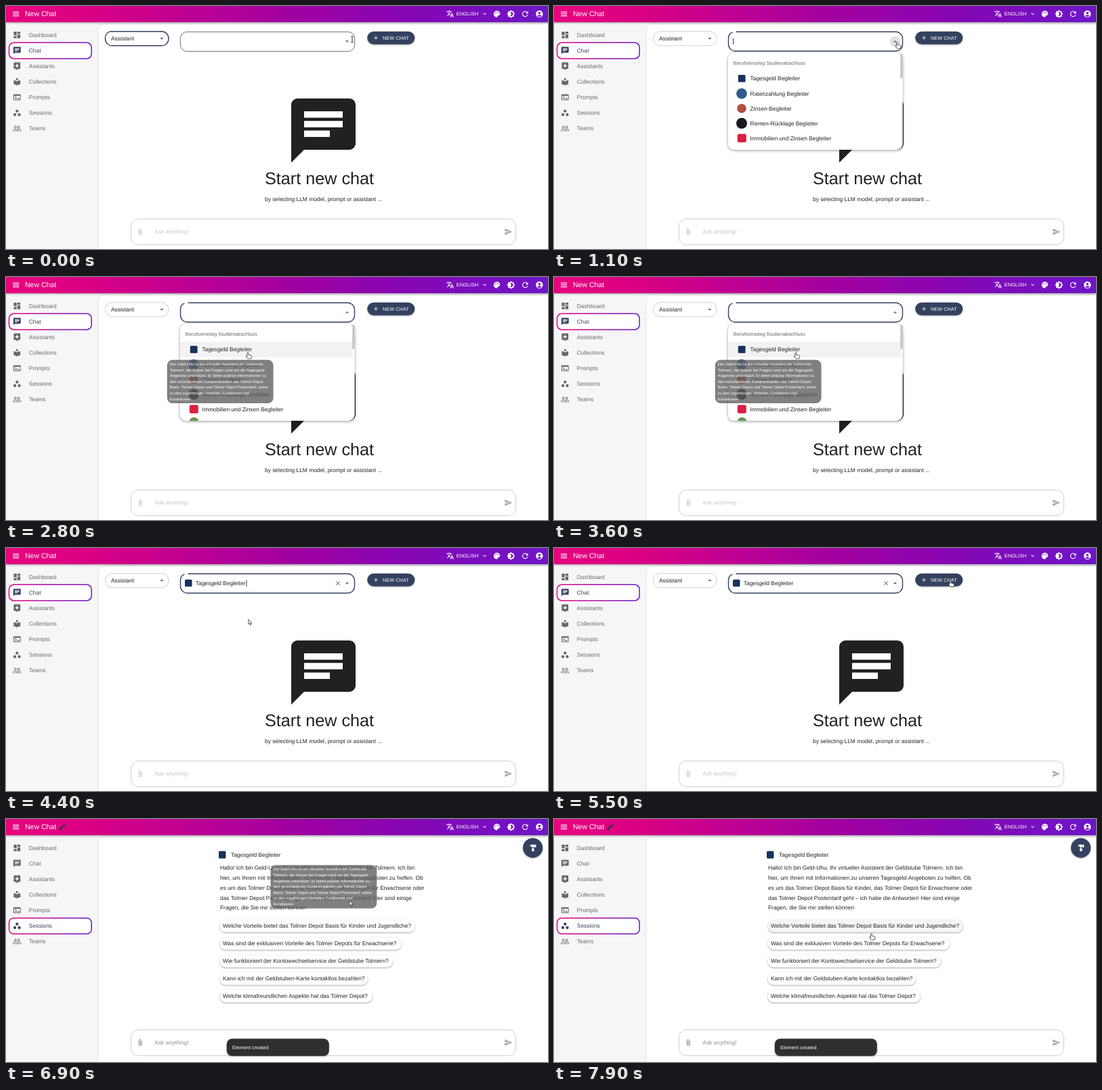
Recreate the animation shown at these times as an HTML page. Size 800 by 360 pixels, loop 8000 ms.

```html
<!DOCTYPE html>
<html lang="en">
<head>
<meta charset="utf-8">
<title>New Chat</title>
<style>
html, body { margin: 0; width: 100%; height: 100%; overflow: hidden; background: #f6f6f8; }
svg { display: block; width: 800px; height: 360px; }
text { font-family: "Liberation Sans", Arial, sans-serif; font-size: 8.4px; text-rendering: geometricPrecision; white-space: pre; }
.shadow { filter: drop-shadow(0 1px 1.2px rgba(0,0,0,.35)); }
</style>
</head>
<body>
<svg id="stage" viewBox="0 0 800 360" xmlns="http://www.w3.org/2000/svg"></svg>
<script>
const LOOP = 8000, STEP = 100;
const NAVY = '#33415f', GREY = '#686868', INK = '#212121';
const stage = document.getElementById('stage');

// Icon paths on a 24 unit grid
const ICON = {
  dashboard: 'M3 13h8V3H3zm0 8h8v-6H3zm10 0h8V11h-8zm0-18v6h8V3z',
  chat: 'M20 2H4c-1.1 0-2 .9-2 2v18l4-4h14c1.1 0 2-.9 2-2V4c0-1.1-.9-2-2-2zM6 9h12v2H6zm8 5H6v-2h8zm4-6H6V6h12z',
  spark: 'M19 2H5c-1.1 0-2 .9-2 2v14c0 1.1.9 2 2 2h4l3 3 3-3h4c1.1 0 2-.9 2-2V4c0-1.1-.9-2-2-2zm-5.1 10.9L12 17l-1.9-4.1L6 11l4.1-1.9L12 5l1.9 4.1L18 11z',
  library: 'M12 11.5C9.6 9.4 6.5 8 3 8v11c3.5 0 6.6 1.4 9 3.5 2.4-2.1 5.5-3.5 9-3.5V8c-3.5 0-6.6 1.4-9 3.5zM12 8a3 3 0 100-6 3 3 0 000 6z',
  terminal: 'M20 4H4a2 2 0 00-2 2v12c0 1.1.9 2 2 2h16a2 2 0 002-2V6a2 2 0 00-2-2zm0 14H4V8h16zm-2-1h-6v-2h6zM7.5 17l-1.4-1.4L8.7 13l-2.6-2.6L7.5 9l4 4z',
  dots: 'M6 13a4 4 0 100 8 4 4 0 000-8zM12 3a4 4 0 100 8 4 4 0 000-8zM18 13a4 4 0 100 8 4 4 0 000-8z',
  people: 'M16.5 13c-1.2 0-3.1.3-4.5 1-1.4-.7-3.3-1-4.5-1C5.3 13 1 14.1 1 16.2V19h22v-2.8c0-2.1-4.3-3.2-6.5-3.2zm-4 4.5h-10v-1.3c0-.5 2.6-1.7 5-1.7s5 1.2 5 1.7zm9 0H14v-1.3c0-.4-.2-.8-.5-1.2.9-.3 1.9-.5 3-.5 2.4 0 5 1.2 5 1.7zM7.5 12a3.5 3.5 0 100-7 3.5 3.5 0 000 7zm0-5.5a2 2 0 110 4 2 2 0 010-4zM16.5 12a3.5 3.5 0 100-7 3.5 3.5 0 000 7zm0-5.5a2 2 0 110 4 2 2 0 010-4z',
  translate: 'M12.9 15.1l-2.6-2.5c1.8-2 3-4.2 3.8-6.6H17V4h-7V2H8v2H1v2h11.2c-.7 1.9-1.8 3.8-3.2 5.4C8.1 10.300 7.300 9.200 6.700 8h-2c.7 1.600 1.700 3.200 3 4.600l-5.100 5L4 19l5-5 3.100 3.100zM18.500 10h-2L12 22h2l1.100-3h4.800l1.100 3h2zm-2.600 7l1.600-4.300 1.600 4.300z',
  palette: 'M12 2a10 10 0 100 20c1.400 0 2.500-1.100 2.500-2.500 0-.6-.2-1.200-.6-1.700-.4-.4 0-.8.4-.8H16c3.300 0 6-2.700 6-6 0-5-4.500-9-10-9zM6.500 9a1.500 1.500 0 110 3 1.500 1.500 0 010-3zM9.500 5a1.500 1.500 0 110 3 1.500 1.500 0 010-3zM14.500 5a1.500 1.500 0 110 3 1.500 1.500 0 010-3zM17.500 9a1.500 1.500 0 110 3 1.500 1.500 0 010-3z',
  bright: 'M20 8.700V4h-4.700L12 .7 8.700 4H4v4.700L.7 12 4 15.300V20h4.700l3.300 3.300 3.300-3.300H20v-4.700l3.300-3.300zM12 18c-.9 0-1.700-.2-2.500-.6a6 6 0 000-10.800A6 6 0 1112 18z',
  refresh: 'M17.600 6.400A8 8 0 1019.700 14h-2.100A6 6 0 1112 6c1.700 0 3.100.7 4.200 1.800L13 11h7V4z',
  account: 'M12 2a10 10 0 100 20 10 10 0 000-20zm0 4a3.500 3.500 0 110 7 3.500 3.500 0 010-7zm0 14c-2 0-4.400-.8-6.100-2.900a10 10 0 0112.200 0C16.400 19.200 14 20 12 20z',
  more: 'M16.600 8.600L12 13.200 7.400 8.600 6 10l6 6 6-6z',
  send: 'M2 21l21-9L2 3v7l15 2-15 2z',
  clip: 'M16.500 6v11.500a4 4 0 01-8 0V5a2.500 2.500 0 015 0v10.500a1 1 0 01-2 0V6H10v9.500a2.500 2.500 0 005 0V5a4 4 0 00-8 0v12.500a5.500 5.500 0 0011 0V6z',
  edit: 'M3 17.200V21h3.800L17.800 9.900l-3.700-3.700zM20.700 7c.4-.4.4-1 0-1.400l-2.300-2.300c-.4-.4-1-.4-1.400 0l-1.900 1.800 3.800 3.800z',
  tool: 'M18 3l-3 3V3H9C6.200 3 4 5.200 4 8h5v3h6V8l3 3h2V3zM9 13v7c0 .6.4 1 1 1h4c.6 0 1-.4 1-1v-7z',
  plus: 'M19 13h-6v6h-2v-6H5v-2h6V5h2v6h6z',
  cross: 'M19 6.400L17.600 5 12 10.600 6.400 5 5 6.400l5.600 5.600L5 17.600 6.400 19l5.600-5.600 5.600 5.600 1.400-1.400-5.600-5.600z'
};

const icon = (name, cx, cy, size, fill, id = '') =>
  `<path ${id && `id="${id}"`} d="${ICON[name]}" fill="${fill}" fill-rule="evenodd" transform="translate(${cx - size / 2} ${cy - size / 2}) scale(${size / 24})"/>`;
const text = (s, x, y, fill = INK, size = 8.4, more = '') =>
  `<text x="${x}" y="${y}" fill="${fill}" style="font-size:${size}px" ${more}>${s}</text>`;
const box = (x, y, w, h, r, fill, more = '') =>
  `<rect x="${x}" y="${y}" width="${w}" height="${h}" rx="${r}" fill="${fill}" ${more}/>`;
const dot = (x, y, r, fill) => `<circle cx="${x}" cy="${y}" r="${r}" fill="${fill}"/>`;
const arrow = (x, y, up) => {
  const d = up ? -1.3 : 1.3;
  return `<path d="M${x - 2.6} ${y - d}h5.2l-2.6 ${2 * d}z" fill="#666"/>`;
};
const group = (id, body) => `<g id="${id}">${body}</g>`;
const line = (x, y, h) => `<path d="M${x} ${y}v${h}" stroke="#222" stroke-width=".9"/>`;

const nav = [['Dashboard', 'dashboard'], ['Chat', 'chat'], ['Assistants', 'spark'],
  ['Collections', 'library'], ['Prompts', 'terminal'], ['Sessions', 'dots'], ['Teams', 'people']];
const rowY = i => 42.8 + 23.1 * i;

const header = box(0, 0, 800, 24, 0, 'url(#bar)', 'style="filter:drop-shadow(0 1px 1.5px rgba(0,0,0,.4))"') +
  [9, 11.8, 14.6].map(y => box(10, y - .6, 9.3, 1.2, 0, '#fff')).join('') +
  text('New Chat', 28, 15.4, '#fff', 10.5) +
  group('pencil', icon('edit', 83, 12, 12.5, '#3a3346')) +
  icon('translate', 655.5, 11.8, 12, '#fff') + text('ENGLISH', 664.7, 14.4, '#fff', 7.45) +
  icon('more', 706.5, 11.6, 10, '#fff') + icon('palette', 724.5, 11.8, 11.5, '#fff') +
  icon('bright', 745.3, 11.8, 12.5, '#fff') + icon('refresh', 766.3, 11.8, 13, '#fff') +
  icon('account', 787.3, 11.8, 12.5, '#fff');

const sidebar = group('mark', box(4.5, 54.3, 121.7, 23.6, 7, '#fff', 'stroke="url(#edge)" stroke-width="1.5"')) +
  nav.map(([label, name], i) => icon(name, 16.3, rowY(i), 13, GREY, 'ni' + i) +
    text(label, 33.8, rowY(i) + 3, GREY, 8.4, `id="nt${i}"`)).join('');

const hero = icon('chat', 468.5, 184.5, 114, INK) +
  text('Start new chat', 382, 264, INK, 25.2) +
  text('by selecting LLM model, prompt or assistant ...', 382, 289, INK);

const notched = (x, y, w, h, r, gap, color, width) =>
  `<path d="M${x + r + gap} ${y}H${x + w - r}a${r} ${r} 0 01${r} ${r}V${y + h - r}a${r} ${r} 0 01${-r} ${r}H${x + r}a${r} ${r} 0 01${-r} ${-r}V${y + r}q0 ${-r * .75} ${r * .6} ${-r * .94}" fill="none" stroke="${color}" stroke-width="${width}"/>`;

const controls =
  group('selDark', notched(146.500, 37.800, 93.500, 21, 10, -4, NAVY, 1.4)) +
  group('selLight', box(146.500, 37.800, 93.500, 21, 10, 'none', 'stroke="#ccd0d8"')) +
  text('Assistant', 155, 51, INK) + arrow(230, 48.4) +
  group('boxIdle', box(257.300, 38.300, 257.400, 29, 10, 'none', 'stroke="#666f80"')) +
  group('boxFocus', notched(257.500, 38.300, 257, 28.500, 10, 1, NAVY, 1.4)) +
  group('halo', dot(503.5, 52.6, 8, '#e2e2e2')) +
  group('down', arrow(503.5, 52.6)) + group('up', arrow(503.5, 52.2, true)) +
  group('caret1', line(264.6, 47.500, 9.500)) +
  group('chosen', box(264, 46.800, 10.500, 10.500, 1.500, '#17325c') + text('Tagesgeld Begleiter', 279.8, 55) +
    icon('cross', 490, 52.3, 10.5, '#666')) +
  group('caret2', line(355, 47.500, 9.500)) +
  `<g class="shadow">${box(533.3, 37.800, 70, 19, 9.5, NAVY)}</g>` +
  icon('plus', 546, 47.2, 10, '#fff') + text('NEW CHAT', 556, 49.9, '#fff', 7.35);

const options = ['Tagesgeld Begleiter', 'Ratenzahlung Begleiter', 'Zinsen-Begleiter',
  'Renten-Rücklage Begleiter', 'Immobilien und Zinsen Begleiter'];
const badges = [box(271.800, 102, 10.800, 10.800, 1.500, '#17325c'), dot(277, 129.7, 7.8, '#2f5b8c'),
  dot(277, 151.8, 6.8, '#b1503f'), dot(277, 173.8, 8, '#17191e'), box(270.800, 189.500, 13, 12.500, 2.500, '#dc1f3f')];
const menu = `<g style="filter:drop-shadow(0 1px 2px rgba(0,0,0,.4))">${box(256.8, 69.5, 257.900, 143.500, 9, '#fff')}</g>` +
  text('Berufseinstieg Studienabschluss', 264.8, 86.7, '#666', 7.35) +
  group('hover', box(257, 96.200, 254.500, 22.800, 0, '#f2f2f2')) +
  badges.join('') + options.map((s, i) => text(s, 289.6, 110.4 + 22.1 * i)).join('') +
  group('sixth', '<path d="M271 213a6.500 5 0 0113 0z" fill="#62994f"/>') +
  box(511.300, 71, 3.200, 36, 1, '#c3c3c3');

const tipLines = ['Der Geld-Uhu ist ein virtueller Assistent der Geldstube',
  'Tolmern, der Nutzer bei Fragen rund um die Tagesgeld-',
  'Angebote unterstützt. Er liefert präzise Informationen zu',
  'den verschiedenen Kontenmodellen wie Tolmer Depot',
  'Basis, Tolmer Depot und Tolmer Depot Postentarif, sowie',
  'zu den zugehörigen Vorteilen, Funktionen und', 'Konditionen'];
const tip = (id, x, y) => group(id, box(x, y, 156.800, 64.300, 8, '#616161', 'fill-opacity=".8"') +
  tipLines.map((s, i) => text(s, x + 4, y + 8.1 + 8.6 * i, '#fff', 5.75)).join(''));

const BONE = '#e0e0e2';
const skeleton = [0, 1, 2, 3].map(i => {
  const y = 37 + 35.6 * i, left = i % 2;
  return box(left ? 274.5 : 453, y, 210, 26.500, 0, BONE) + dot(left ? 245.4 : 692.4, y + 6, 10.2, BONE);
}).join('');

const reply = ['Hallo! Ich bin Geld-Uhu, Ihr virtueller Assistent der Geldstube Tolmern. Ich bin',
  'hier, um Ihnen mit Informationen zu unseren Tagesgeld-Angeboten zu helfen. Ob',
  'es um das Tolmer Depot Basis für Kinder, das Tolmer Depot für Erwachsene oder',
  'das Tolmer Depot Postentarif geht – ich habe die Antworten! Hier sind einige',
  'Fragen, die Sie mir stellen können'];
const asks = [['Welche Vorteile bietet das Tolmer Depot Basis für Kinder und Jugendliche?', 288],
  ['Was sind die exklusiven Vorteile des Tolmer Depots für Erwachsene?', 268.5],
  ['Wie funktioniert der Kontowechselservice der Geldstube Tolmern?', 255.5],
  ['Kann ich mit der Geldstuben-Karte kontaktlos bezahlen?', 218.5],
  ['Welche klimafreundlichen Aspekte hat das Tolmer Depot?', 225.5]];
const answer = box(314, 47.500, 10.500, 11, 1.5, '#17325c') + text('Tagesgeld Begleiter', 332, 56) +
  reply.map((s, i) => text(s, 316, 75.400 + 14.7 * i)).join('') +
  asks.map(([s, w], i) => `<g class="shadow">${box(315.500, 149.500 + 26 * i, w, 18.300, 9, '#fff', `id="ask${i}"`)}</g>` +
    text(s, 320, 160.7 + 26 * i)).join('') +
  `<g class="shadow">${dot(777.6, 42.8, 14.6, NAVY)}</g>` + icon('tool', 777.8, 42.8, 13.5, '#fff');

const prompt = box(184.500, 315.500, 568, 38.300, 11, '#fff', 'stroke="#cbcfd7"') +
  icon('clip', 198, 334.500, 11, '#777', 'clip') + text('Ask anything!', 219.3, 337.4, '#8c8c8c', 8.4, 'id="ask"') +
  icon('send', 741.5, 334.5, 12.800, '#a9a9a9');

const snack = `<g class="shadow">${box(325.800, 325.500, 151, 25.500, 8, '#2f2f2f')}</g>` + text('Element created', 334, 340.900, '#fff', 7.35);

const outline = 'stroke="#333" stroke-width=".8" stroke-linejoin="round"';
const cursor = group('cursor',
  group('beam', '<path d="M-2-4q2 0 2 1 0-1 2-1M0-3v7M-2 5q2 0 2-1 0 1 2 1" fill="none" stroke="#222" stroke-width=".9"/>') +
  group('point', `<path d="M0 0v7.500l1.700-1.600 1.200 2.700 1.200-.6-1.200-2.500h2.300z" fill="#fff" ${outline}/>`) +
  group('hand', `<path d="M0 .8q.9-1.200 1.800 0v3l4 .8q1 .3 .8 1.500l-.7 3.400H1L-1.900 5.800q0-1.300 1.900 .2z" fill="#fff" ${outline}/>`));

stage.innerHTML = `<defs>
  <linearGradient id="bar"><stop offset="0" stop-color="#e8047f"/><stop offset=".16" stop-color="#d90084"/>
  <stop offset=".5" stop-color="#a4009f"/><stop offset=".75" stop-color="#8507b5"/><stop offset="1" stop-color="#6d16c8"/></linearGradient>
  <linearGradient id="edge"><stop offset="0" stop-color="#e6007e"/><stop offset="1" stop-color="#6a16c6"/></linearGradient></defs>` +
  box(0, 0, 800, 360, 0, '#f6f6f8') +
  box(136, 26.500, 680, 350, 9, '#fff', 'stroke="#e2e2e6"') + sidebar +
  group('start', hero + controls) + group('bones', skeleton) + group('answer', answer) +
  group('prompt', prompt) + group('menu', menu) + tip('tip1', 237.8, 122.8) + tip('tip2', 390.500, 68.300) +
  header + group('snack', snack) + cursor;

const $ = id => document.getElementById(id);
const show = (id, on) => { $(id).style.display = on ? '' : 'none'; };
const clamp = v => Math.max(0, Math.min(1, v));
const fade = (t, a, b) => clamp((t - a) / 200) * clamp((b - t) / 200);

// time, x, y of the pointer tip
const path = [[0, 511, 49], [400, 511, 49], [800, 505.5, 53.500], [1400, 505.5, 53.500], [2200, 356, 111.500],
  [3700, 356, 111.500], [3900, 357.8, 105.500], [4500, 357.8, 105.500], [5300, 584, 48], [6300, 584, 48],
  [6800, 507, 121], [7200, 507, 121], [7700, 467.5, 169.500], [8000, 467.5, 169.500]];
function pointer(t) {
  const i = path.findIndex(k => k[0] > t), a = path[i - 1], b = path[i];
  const p = (t - a[0]) / (b[0] - a[0]), e = p * p * (3 - 2 * p);
  return [a[1] + (b[1] - a[1]) * e, a[2] + (b[2] - a[2]) * e];
}

function draw(t) {
  const open = t >= 900 && t < 3700, picked = t >= 3700, session = t >= 6000, done = t >= 6500;
  show('start', !session);
  show('bones', session && !done);
  show('answer', done);
  show('pencil', session);
  show('menu', open);
  show('selDark', t < 900);
  show('selLight', t >= 900);
  show('boxIdle', t < 900);
  show('boxFocus', t >= 900);
  show('halo', t >= 700 && t < 1600);
  show('up', open);
  show('down', !open);
  show('chosen', picked);
  show('caret1', open && (t - 900) % 1000 < 500);
  show('caret2', picked && t < 5500 && (t - 3300) % 1000 >= 500 === false || (t >= 4200 && t < 4600));
  show('hover', t >= 2100);
  show('sixth', t >= 1400);
  $('tip1').style.opacity = fade(t, 2200, 3800);
  $('tip2').style.opacity = fade(t, 6600, 7400);

  const active = session ? 5 : 1, lit = t >= 6300 ? 5 : 1;
  $('mark').setAttribute('transform', `translate(0 ${(active - 1) * 23.1})`);
  nav.forEach((_, i) => {
    $('nt' + i).setAttribute('fill', i === active ? NAVY : GREY);
    $('ni' + i).setAttribute('fill', i === lit ? NAVY : GREY);
  });

  $('prompt').setAttribute('transform', `translate(0 ${done ? -3.200 : 0})`);
  $('ask').style.opacity = $('clip').style.opacity = session ? 1 : .5;
  $('ask0').setAttribute('fill', t >= 7600 ? '#f5f5f5' : '#fff');

  const p = clamp((t - 6000) / 280), s = 1 - .07 * (1 - p);
  $('snack').style.opacity = p;
  $('snack').setAttribute('transform', `translate(401 338) scale(${s}) translate(-401 -338)`);

  const [x, y] = pointer(t);
  const hand = (t >= 700 && t < 1600) || (t >= 2000 && t < 3700) || (t >= 5200 && t < 6000) || t >= 7600;
  $('cursor').setAttribute('transform', `translate(${x} ${y})`);
  show('beam', t < 700);
  show('hand', hand);
  show('point', t >= 700 && !hand);
}

const begin = performance.now();
function tick() {
  const t = (performance.now() - begin) % LOOP;
  draw(Math.floor(t / STEP) * STEP);
  requestAnimationFrame(tick);
}
draw(0);
requestAnimationFrame(tick);
</script>
</body>
</html>
```
